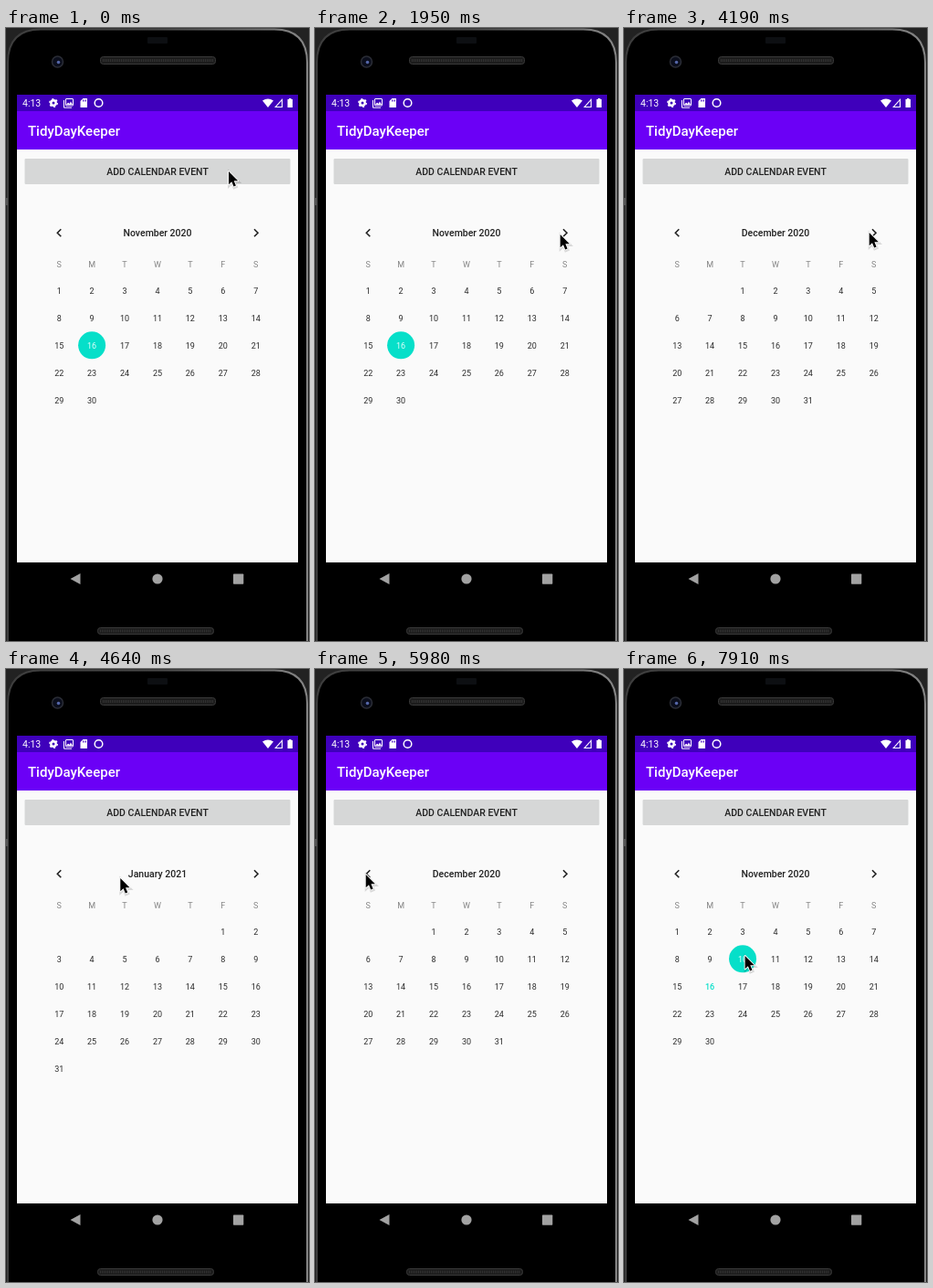
An HTML page that plays this animation: 332x671 px, repeating every 8 s.

```html
<!DOCTYPE html>
<html lang="en">
<head>
<meta charset="utf-8">
<title>Calendar demo</title>
<style>
  html, body { margin: 0; width: 100%; height: 100%; overflow: hidden; background: #000; }
  svg { display: block; width: 332px; height: 671px; font-family: Roboto, "Open Sans", sans-serif; }
  .mid { text-anchor: middle; }
  .bold { font-weight: 500; }
</style>
</head>
<body>
<svg viewBox="0 0 332 671">
  <defs>
    <linearGradient id="rim">
      <stop offset="0" stop-color="#3d3d3d"/>
      <stop offset=".5" stop-color="#4a4a4a"/>
      <stop offset="1" stop-color="#858585"/>
    </linearGradient>
    <path id="arrow" d="M0 0V14.300L3.300 11.300 5.500 16.500 7.900 15.500 5.700 10.300H10.200Z"/>
  </defs>

  <!-- phone body -->
  <rect width="332" height="671" fill="#222"/>
  <path d="M2 680V38Q2 1.500 38 1.500H294Q330 1.500 330 38V680Z" stroke="url(#rim)" stroke-width="2"/>
  <rect y="186" width="2" height="8" fill="#555"/>
  <rect x="155" y="10" width="22" height="7" rx="1" fill="#0d0f12"/>
  <circle cx="56.500" cy="37" r="6" fill="#0b0e1c" stroke="#2b2d36" stroke-width="1.500"/>
  <circle cx="57.500" cy="37.500" r="1.800" fill="#5566a8"/>
  <g fill="#1c1c1c" stroke="#3a3a3a">
    <rect x="103.500" y="31.500" width="126" height="8" rx="3"/>
    <rect x="100.500" y="656.500" width="127" height="7" rx="3"/>
  </g>
  <path d="M106 35.500H227M103 660H225" stroke="#333" stroke-width="3" stroke-dasharray="1 1"/>

  <!-- screen -->
  <rect x="12" y="73" width="308" height="512" fill="#fafafa"/>
  <rect x="12" y="91" width="308" height="42" fill="#6b00f6"/>
  <rect x="12" y="73" width="308" height="18" fill="#3f00bb"/>
  <g fill="#fff">
    <text x="18" y="86" font-size="10.5">4:13</text>
    <text x="24" y="118" font-size="15" class="bold">TidyDayKeeper</text>
    <g fill="none" stroke="#fff">
      <circle cx="52" cy="82" r="2.700" stroke-width="2.400"/>
      <circle cx="52" cy="82" r="4.300" stroke-width="1.300" stroke-dasharray="2 2.503"/>
      <path d="M63.500 79V87.200H72"/>
      <rect x="65.500" y="77.500" width="8" height="7.500" rx=".5"/>
      <circle cx="101.500" cy="82" r="4.300" stroke-width="1.500"/>
      <path d="M295.300 86.500H302.500V78.500Z" stroke-width="1.100"/>
    </g>
    <path d="M66 84L68 81.500 69.500 83 71 80.500 73 84Z"/>
    <path d="M84.500 77H89V87H81.500V80Z"/>
    <path d="M281 79.500Q287 75.500 293 79.500L287 87Z"/>
    <path d="M308.500 78H310V77H312.500V78H314V87H308.500Z"/>
  </g>
  <path d="M84.500 78.500V80.500M86 78.500V80.500M87.500 78.500V80.500" stroke="#3f00bb" stroke-width=".8"/>

  <rect x="20.500" y="143" width="291" height="28" rx="1" fill="#d6d7d7"/>
  <text x="166" y="161" font-size="10.5" class="mid bold" fill="#212121">ADD CALENDAR EVENT</text>

  <!-- calendar -->
  <circle id="ripple" cy="224" r="24"/>
  <g fill="none" stroke="#222" stroke-width="1.600">
    <path d="M60.300 220.300L56.300 224.300 60.300 228.300"/>
    <path d="M272 220.300L276 224.300 272 228.300"/>
  </g>
  <text id="month" x="166" y="228" font-size="10.5" class="mid bold" fill="#212121"></text>
  <circle id="pick" r="15" fill="#06dfc9"/>
  <g id="grid" class="mid" font-size="9"></g>

  <!-- navigation bar -->
  <g fill="#a2a2a2">
    <path d="M70.500 603L81.500 597V609Z"/>
    <circle cx="166" cy="603" r="5.600"/>
    <rect x="249" y="597.500" width="11.300" height="11.300" rx=".7"/>
  </g>

  <g id="cursor">
    <use href="#arrow" x=".5" y="1.200" stroke="#000" stroke-width="3" opacity=".13"/>
    <use href="#arrow" stroke="#fff" stroke-width="1.800" stroke-linejoin="round" paint-order="stroke"/>
  </g>
</svg>
<script>
const LOOP = 8000, STEP = 150, TEAL = "#06dfc9", INK = "#2b2b2b";
const NOVEMBER = 10, TODAY = 16, NEXT = 274, BACK = 58;
const $ = id => document.getElementById(id);
const set = (el, attrs) => { for (const k in attrs) el.setAttribute(k, attrs[k]); };
const colX = slot => 58.2 + 35.92 * (slot % 7);
const rowY = slot => 287.3 + 30 * Math.floor(slot / 7);

function label(x, y, fill, text = "") {
  const el = document.createElementNS("http://www.w3.org/2000/svg", "text");
  set(el, { x, y, fill });
  el.textContent = text;
  return $("grid").appendChild(el);
}

[..."SMTWTFS"].forEach((day, i) => label(colX(i), 262.2, "#858585", day));
const cells = Array.from({ length: 42 }, (_, i) => label(colX(i), rowY(i) + 3.2, INK));

// Each move is a curve from the previous end, drawn in whole steps
const home = [244, 157];
const moves = [
  { at: 150, steps: 1, bend: home, to: [242.5, 157] },
  { at: 600, steps: 1, bend: home, to: [239, 156] },
  { at: 1050, steps: 3, bend: [200, 170], to: [171, 220] },
  { at: 1500, steps: 4, bend: [320, 255], to: [268.7, 226] },
  { at: 2540, steps: 3, bend: [276, 228], to: [273, 225] },
  { at: 4040, steps: 2, bend: [271, 225], to: [268.7, 224] },
  { at: 4490, steps: 7, bend: [-40, 236], to: [55.7, 225] },
  { at: 6260, steps: 4, bend: [80, 190], to: [166, 150.5] },
  { at: 6860, steps: 5, bend: [175, 160], to: [132.6, 314] }
];

const clicks = [
  { at: 3440, x: NEXT, by: 1 },
  { at: 4490, x: NEXT, by: 1 },
  { at: 5680, x: BACK, by: -1 },
  { at: 6270, x: BACK, by: -1 }
];
const PICK_TIME = 7760;

function pointer(t) {
  let from = home;
  for (const { at, steps, bend, to } of moves) {
    if (t < at) break;
    const u = Math.min(1, (Math.floor((t - at) / STEP) + 1) / steps);
    const v = 1 - u;
    from = from.map((p, i) => v * v * p + 2 * u * v * bend[i] + u * u * to[i]);
  }
  return from;
}

function drawMonth(index, chosen) {
  const first = new Date(2020, index, 1);
  const offset = first.getDay();
  const count = new Date(2020, index + 1, 0).getDate();
  const current = index === NOVEMBER;
  $("month").textContent = first.toLocaleDateString("en-US", { month: "long", year: "numeric" });
  cells.forEach((cell, i) => {
    const day = i - offset + 1;
    const picked = current && day === chosen;
    const today = current && day === TODAY;
    cell.textContent = day > 0 && day <= count ? day : "";
    set(cell, { fill: picked ? "#e4fffb" : today ? TEAL : INK, "font-weight": today && !picked ? 500 : 400 });
  });
  const slot = chosen + offset - 1;
  set($("pick"), { cx: colX(slot), cy: rowY(slot), opacity: current ? 1 : 0 });
}

let shown = "";
function render(t) {
  set($("cursor"), { transform: `translate(${pointer(t)})` });

  const done = clicks.filter(c => c.at <= t);
  const last = done[done.length - 1];
  const pressed = last && t - last.at < STEP;
  set($("ripple"), { cx: last ? last.x : NEXT, opacity: pressed ? 0.1 : 0 });

  const month = done.reduce((m, c) => m + c.by, NOVEMBER);
  const chosen = t < PICK_TIME ? TODAY : 10;
  const key = month + "/" + chosen;
  if (key !== shown) drawMonth(month, chosen);
  shown = key;
}

function tick() {
  render(performance.now() % LOOP);
  requestAnimationFrame(tick);
}
tick();
</script>
</body>
</html>
```
